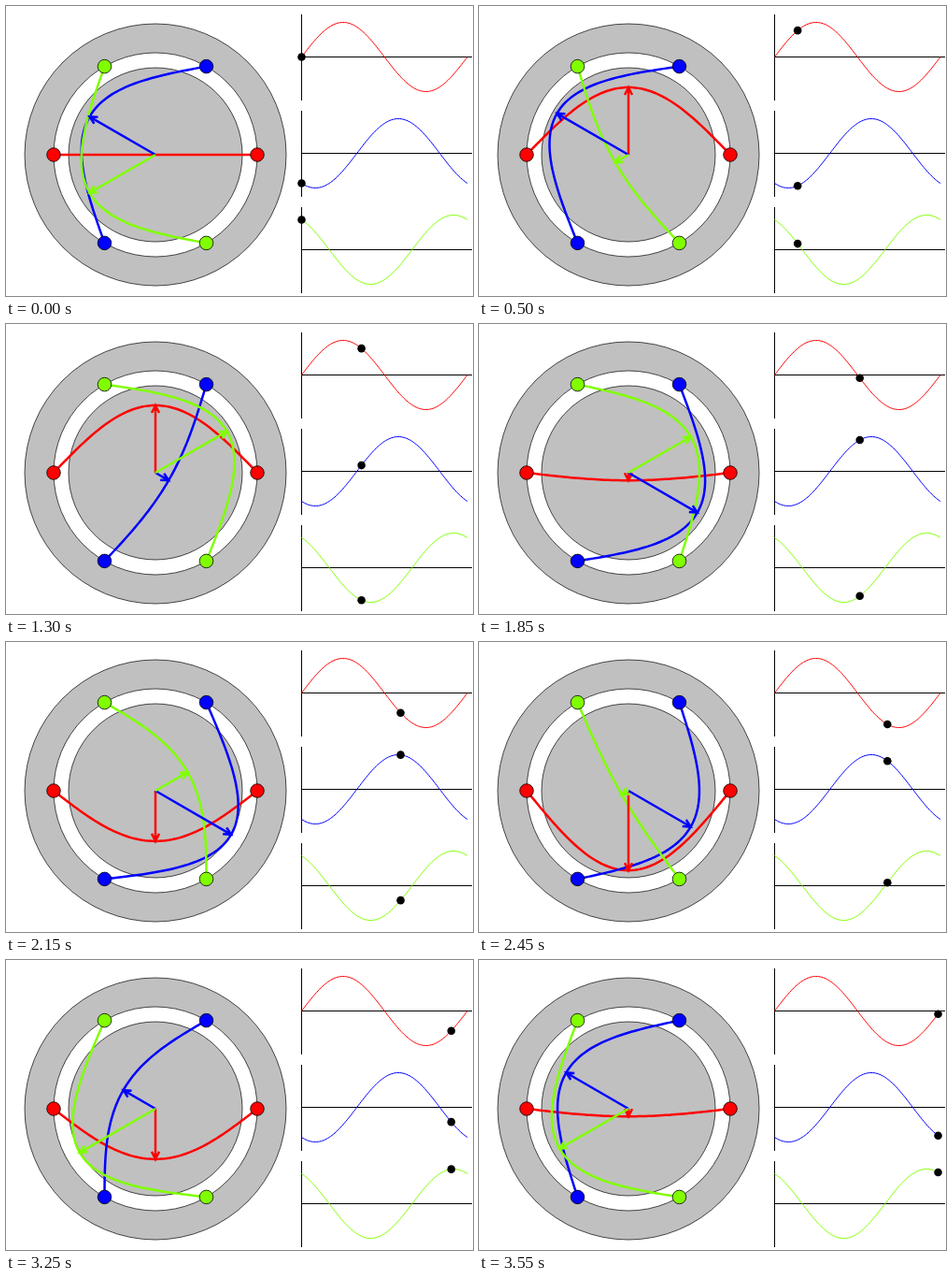
An HTML page for the animation above (3.6 s loop, 500x310 px).

```html
<!DOCTYPE html>
<html lang="en">
<head>
<meta charset="utf-8">
<title>Three-phase rotating field</title>
<style>
  html, body { margin: 0; width: 100%; height: 100%; overflow: hidden; background: #fff; }
  svg { display: block; width: 500px; height: 310px; }
</style>
</head>
<body>
<svg id="stage" viewBox="0 0 500 310"></svg>
<script>
const CX = 160, CY = 159, STATOR = 109, FIELD = 94;
const PLOT_X = 316.5, PERIOD = 177.5, AMP = 37;
const STEPS = 72, STEP_MS = 50;
const RAD = Math.PI / 180;

// shift: phase angle; dir: direction of the positive field; axis: plot baseline
const phases = [
  { color: '#f00', shift: 0, dir: -90, axis: 54.5 },
  { color: '#00f', shift: -120, dir: 30, axis: 157.5 },
  { color: '#80ff00', shift: 120, dir: 150, axis: 260.5 }
];

const stage = document.getElementById('stage');

function add(tag, attrs) {
  const el = document.createElementNS('http://www.w3.org/2000/svg', tag);
  for (const key in attrs) el.setAttribute(key, attrs[key]);
  return stage.appendChild(el);
}

function disc(cx, cy, r, fill, width) {
  return add('circle', { cx, cy, r, fill, stroke: '#000', 'stroke-width': width });
}

function stroke(color, width, d = '') {
  return add('path', { d, fill: 'none', stroke: color, 'stroke-width': width });
}

function trace(count, point) {
  let d = '';
  for (let i = 0; i <= count; i++) {
    const [x, y] = point(i / count);
    d += (i ? 'L' : 'M') + x.toFixed(2) + ' ' + y.toFixed(2);
  }
  return d;
}

const wave = (phase, deg) => Math.sin((deg + phase.shift) * RAD);

// along: distance on the field axis, across: distance on the winding axis
function place(phase, along, across) {
  const c = Math.cos(phase.dir * RAD), s = Math.sin(phase.dir * RAD);
  return [CX + along * c - across * s, CY + along * s + across * c];
}

function bulge(phase, size) {
  return trace(60, u => {
    const v = 2 * u - 1;
    return place(phase, size * Math.cos(v * Math.PI / 2), v * STATOR);
  });
}

function arrow(phase, size) {
  const back = size - Math.sign(size) * 8;
  const at = (a, b) => place(phase, a, b).map(n => n.toFixed(2)).join(' ');
  let d = `M${CX} ${CY}L${at(size, 0)}`;
  if (Math.abs(size) > 0.01) d += `M${at(back, 4)}L${at(size, 0)}L${at(back, -4)}`;
  return d;
}

disc(CX, CY, 140, '#c0c0c0', 0.7);
disc(CX, CY, STATOR, '#fff', 0.7);
disc(CX, CY, 93, '#c0c0c0', 0.7);

for (const p of phases) p.curve = stroke(p.color, 2.5);
for (const p of phases) p.arrow = stroke(p.color, 2.5);

for (const p of phases) {
  for (const side of [-STATOR, STATOR]) {
    const [x, y] = place(p, 0, side);
    disc(x, y, 7.3, p.color, 0.8);
  }
  stroke('#000', 1, `M${PLOT_X} ${p.axis - 46}V${p.axis + 46}M${PLOT_X} ${p.axis}H499`)
    .setAttribute('shape-rendering', 'crispEdges');
  stroke(p.color, 1, trace(120, u => [PLOT_X + u * PERIOD, p.axis - AMP * wave(p, u * 360)]));
}
for (const p of phases) p.dot = add('circle', { r: 4.3, fill: '#000' });

function draw(ms) {
  const turn = Math.floor(ms / STEP_MS) % STEPS / STEPS;
  for (const p of phases) {
    const level = wave(p, turn * 360);
    p.curve.setAttribute('d', bulge(p, FIELD * level));
    p.arrow.setAttribute('d', arrow(p, FIELD * level));
    p.dot.setAttribute('cx', PLOT_X + turn * PERIOD);
    p.dot.setAttribute('cy', p.axis - AMP * level);
  }
}

let start = null;
function tick(now) {
  if (start === null) start = now;
  draw(now - start);
  requestAnimationFrame(tick);
}
draw(0);
requestAnimationFrame(tick);
</script>
</body>
</html>
```
